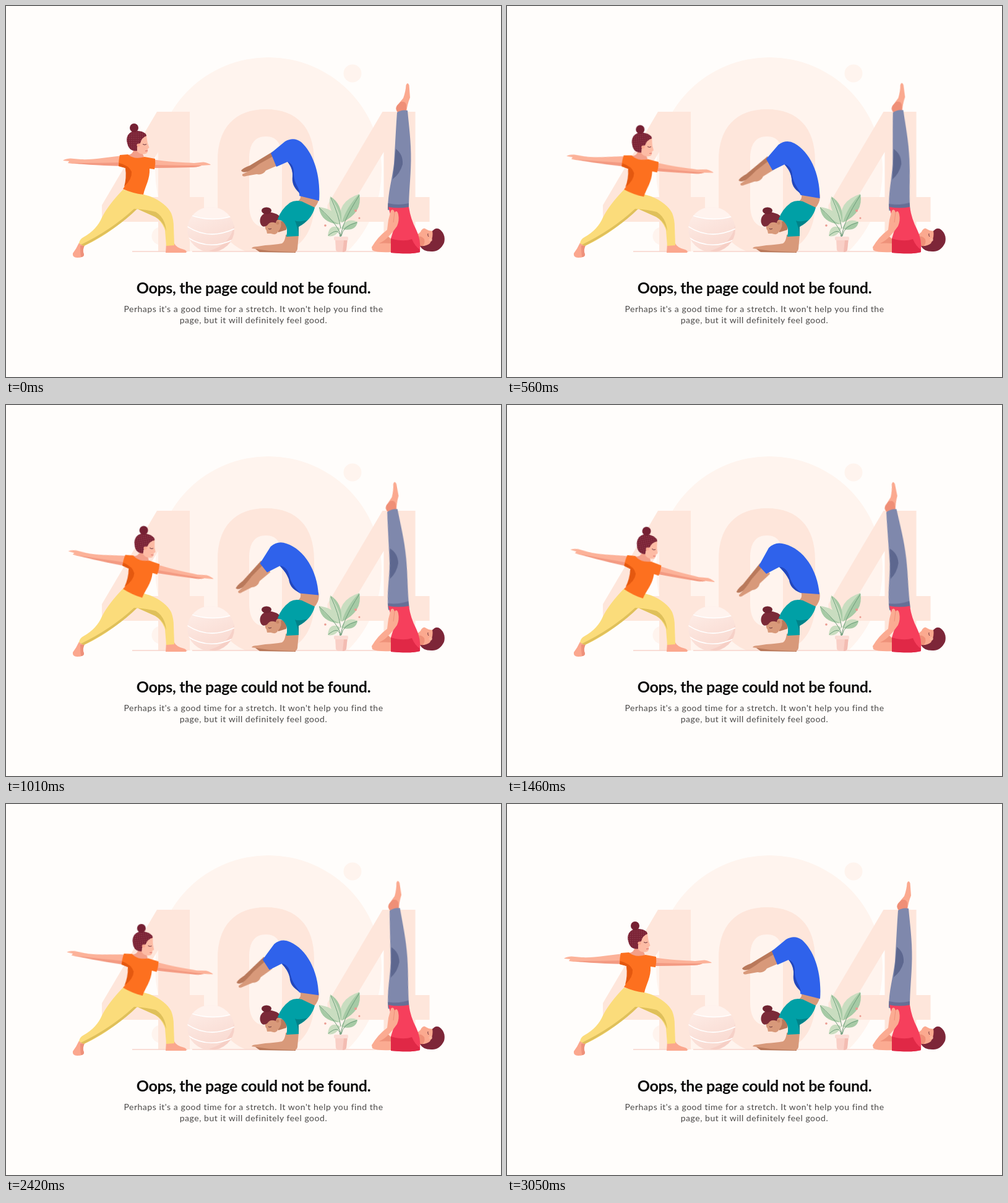
These frames come from a looping animation (800 by 600 pixels, 3.32 s). An HTML page:

```html
<!DOCTYPE html>
<html lang="en">
<head>
<meta charset="utf-8">
<title>Page not found</title>
<style>
html, body { margin: 0; width: 100%; height: 100%; overflow: hidden; background: #fffdfb; }
svg { display: block; width: 100vw; height: 100vh; }
text { font-family: Lato, "Open Sans", sans-serif; text-anchor: middle; }
.title { font-size: 25px; font-weight: 700; letter-spacing: -.3px; fill: #0b0b0b; }
.note { font-size: 14px; letter-spacing: .53px; fill: #4c4a49; }

.sway, .morph { animation: sway 3320ms linear infinite; }
.morph { animation-name: morph; }
.sway { transform-box: view-box; }
.torso { --turn: 11deg; transform-origin: 180px 297px; }
.feet { --turn: -20deg; --dx: -5px; --dy: -2px; transform-origin: 487px 297px; }
.raised { --turn: -7.3deg; transform-origin: 634px 322px; }

@keyframes sway {
  0%, 91.87%, 100% { transform: translate(0, 0) rotate(0deg); }
  6.02% { transform: translate(0, 0) rotate(0deg); animation-timing-function: cubic-bezier(.2, .32, .55, 1); }
  46.08% { transform: translate(var(--dx, 0), var(--dy, 0)) rotate(var(--turn)); }
  48.19% { transform: translate(var(--dx, 0), var(--dy, 0)) rotate(var(--turn)); animation-timing-function: cubic-bezier(.45, 0, .8, .75); }
}
@keyframes morph {
  0%, 91.87%, 100% { d: var(--rest); }
  6.02% { d: var(--rest); animation-timing-function: cubic-bezier(.2, .32, .55, 1); }
  46.08% { d: var(--bent); }
  48.19% { d: var(--bent); animation-timing-function: cubic-bezier(.45, 0, .8, .75); }
}
.thigh {
  --rest: path("M428 238L451 219Q465 211 477 220C497 238 509 274 506 315L474 307C476 300 465 292 463 276C464 266 460 258 455 252L437 260Z");
  --bent: path("M407 260L423 231Q434 220 449 225C479 233 502 266 505 306L475 304C470 302 459 297 456 283C452 275 448 270 440 262L419 273Z");
  d: var(--rest);
}
.crease {
  --rest: path("M455 252C462 254 466 262 465 272C466 288 473 292 475 303C464 294 462 284 463 276C464 266 460 258 455 252Z");
  --bent: path("M440 262C447 261 454 268 456 276C461 291 466 296 475 304C462 299 457 292 456 283C452 275 448 270 440 262Z");
  d: var(--rest);
}
</style>
</head>
<body>
<svg viewBox="0 0 800 600">
  <defs>
    <pattern id="dots" width="3" height="3" patternUnits="userSpaceOnUse">
      <rect width="3" height="3" fill="#7b2336"/>
      <circle cx="1.5" cy="1.5" r=".5" fill="#ab626d"/>
    </pattern>
    <linearGradient id="ballTone" x1="0" y1="0" x2=".35" y2="1">
      <stop offset=".2" stop-color="#fdebe5"/>
      <stop offset="1" stop-color="#f9dad1"/>
    </linearGradient>
    <clipPath id="ballEdge"><ellipse cx="331" cy="361.5" rx="38" ry="36.5"/></clipPath>
    <clipPath id="floor"><rect width="800" height="397"/></clipPath>
    <path id="four" d="M244 171H297V309H320V349H297V397H246V349H155V322ZM246 236L202 309H246Z" fill-rule="evenodd"/>
  </defs>

  <!-- backdrop -->
  <g clip-path="url(#floor)">
    <circle cx="424" cy="266" r="183" fill="#fff4ee"/>
    <circle cx="250" cy="372" r="14.5" fill="#fff4ee"/>
    <g fill="#fee6db">
      <use href="#four"/>
      <use href="#four" x="364.5"/>
      <path fill-rule="evenodd" d="M342 250C342 197 370 167 420 167S498 197 498 250V320C498 372 470 402 420 402S342 372 342 320ZM393 248V320C393 345 402 358 420 358S446 345 446 320V248C446 223 438 211 420 211S393 223 393 248Z"/>
    </g>
  </g>
  <circle cx="560" cy="109" r="14.5" fill="#fff4ee"/>
  <path d="M204 397H293M301 397H620" stroke="#f8d3ca" stroke-width="1.5"/>

  <!-- ball -->
  <g clip-path="url(#ballEdge)">
    <rect x="292" y="324" width="78" height="76" fill="url(#ballTone)"/>
    <path d="M300 324H364L365 340Q335 350 303 338Z" fill="#fff3ee"/>
    <path d="M369 352Q364 386 328 396L350 400L372 380Z" fill="#f4c6bb" opacity=".5"/>
    <g fill="none" stroke="#fff" stroke-width="1.6">
      <path d="M298 338Q331 350 365 340M292 356Q328 380 370 360M293 374Q328 397 369 377"/>
    </g>
  </g>

  <!-- plant -->
  <g>
    <g fill="#c9ddc0">
      <path d="M539 353Q509 351 506 325Q535 329 540 351Z"/>
      <path d="M540 349Q518 330 524 308Q543 320 542 348Z"/>
      <path d="M541 350Q534 316 571 304Q575 335 543 350Z"/>
      <path d="M542 359Q550 341 568 349Q567 363 545 361Z"/>
      <path d="M539 359Q522 351 520 372Q532 375 540 361Z"/>
    </g>
    <g fill="#a6caa5">
      <path d="M539 353Q521 346 506 325Q508 350 539 353Z"/>
      <path d="M541 349Q540 330 524 308Q544 320 542 348Z"/>
      <path d="M543 350Q550 325 571 304Q577 334 543 350Z"/>
      <path d="M544 361Q552 353 568 349Q565 365 544 361Z"/>
    </g>
    <path d="M541 374Q541 358 506 326M541 373Q543 350 571 306M541 360Q538 338 525 310M542 372Q544 356 567 350M540 373Q538 357 521 371" fill="none" stroke="#6e9d7b" stroke-width="1"/>
    <g fill="#ea9a90"><circle cx="565" cy="331" r="2"/><circle cx="516" cy="355" r="1.8"/><circle cx="571" cy="343" r="1.5"/></g>
    <path d="M532 376H552L550 394Q549 398 545 398H538Q534 398 533 394Z" fill="#f9d0c7"/>
    <rect x="530" y="373" width="23" height="6" rx="2" fill="#fbdcd5"/>
    <path d="M546 379H551.5L550 394Q549 398 544 398Z" fill="#f3bcb2"/>
  </g>

  <!-- lunging woman -->
  <g fill="#fba78e">
    <path d="M118 383L127 387Q123 395 126 402Q126 407 115 407Q107 407 108 400Q114 392 118 383Z"/>
    <path d="M120 388L127 387Q123 395 126 402Q126 406 121 406Q120 396 120 388Z" fill="#ee917b"/>
    <path d="M259 384H272Q275 391 288 394Q293 396 291 399H258Z"/>
  </g>
  <path d="M189 297L213 303L223 305C241 309 261 322 267 335Q271 345 271 358L272 387L259 388L257 363Q253 349 241 341L212 328C191 348 158 374 126 388L118 384Q119 377 125 374C140 366 150 354 155 342Q165 322 189 297Z" fill="#fbdc7b"/>
  <path d="M207 328Q226 329 242 333Q257 342 259 364Q254 348 241 341L212 328Q180 360 126 388L121 386Q169 363 207 328Z" fill="#dfc05b"/>
  <g class="sway torso">
    <path d="M190 242C165 244 142 249 121 248L104 246.500Q95 247 92 250L102 251L100 254Q111 256 122 255Q155 257 190 258Z" fill="#fcb299"/>
    <path d="M190 253Q150 254 110 254Q120 257 190 259Z" fill="#f39a82"/>
    <path d="M235 248C262 252 287 253 304 254L319 252.500Q328 254 331 257L316 258Q310 261 297 261L235 262Z" fill="#fcb299"/>
    <path d="M235 257Q275 258 316 258Q310 261 297 261L235 262Z" fill="#f39a82"/>
    <path d="M207 230H221L221 240Q226 246 215 250Q204 248 197 241Q206 240 207 230Z" fill="#f39f89"/>
    <path d="M211 213Q220 206 227 209Q228 218 229 222L231.500 229L229 231Q230 238 225 239Q217 241 212 235Z" fill="#fdbba4"/>
    <path d="M196 222C192 207 204 200 214 202C222 203 227 206 227 210Q219 213 217 222Q211 222 212 234Q199 236 196 222Z" fill="url(#dots)"/>
    <circle cx="207" cy="197" r="7" fill="#752033"/>
    <circle cx="214" cy="225" r="2.6" fill="#fba990"/>
    <path d="M221 223.500Q224 225.500 227 223.500" fill="none" stroke="#68303a" stroke-width="1"/>
    <path d="M225 234.500L229 234" stroke="#d96a65" stroke-width="1"/>
    <path d="M184 241L197 240Q207 249 224 244L241 247Q242 255 240 264L232 263C233 280 225 291 222 305Q205 303 189 296C196 287 195 275 193 262L182 259Q182 248 184 241Z" fill="#fd701f"/>
    <path d="M183 254Q199 258 203 268Q204 280 191 292Q195 278 193 262L182 259Z" fill="#e4580f"/>
  </g>

  <!-- arched woman -->
  <g class="sway feet">
    <path d="M432 235L394 258Q383 262 380 266Q382 270 390 268L416 262L438 248Z" fill="#b9795b"/>
    <path d="M437 240L410 255Q396 266 382 272Q381 277 388 275L405 272Q415 274 420 266L441 257Z" fill="#d8997a"/>
  </g>
  <path d="M470 317Q479 312 475 302L505 303Q508 316 498 327Z" fill="#d8997a"/>
  <path class="morph thigh" fill="#2f62eb"/>
  <path class="morph crease" fill="#2247bd"/>
  <path d="M403 393L440 391L468 396V399L410 398Z" fill="#b9795b"/>
  <path d="M452 370H473L471 393Q470 399 463 398L425 396L397 392Q398 389 406 389L419 387Q435 386 446 384Q451 381 452 370Z" fill="#d8997a"/>
  <path d="M437 346L451 349Q455 354 453 362L440 366Z" fill="#b9795b"/>
  <path d="M420 352Q428 341 443 345Q448 356 439 366Q436 371 428 368L422 368L421 363Q417 359 420 352Z" fill="#d8997a"/>
  <path d="M411 351C408 336 423 331 433 335Q443 337 444 346Q437 344 436 351Q427 347 422 355Q414 360 411 351Z" fill="#7b2a38"/>
  <ellipse cx="421" cy="331" rx="8" ry="5.500" fill="#702432"/>
  <circle cx="439" cy="351" r="2.500" fill="#c98565"/>
  <path d="M424 360Q426 362 429 360" fill="none" stroke="#633039" stroke-width="1"/>
  <path d="M439 345Q444 329 459 318Q467 313 478 316L499 326Q494 346 473 357V372L453 373Q456 360 451 353Q448 347 439 345Z" fill="#00a0a6"/>
  <path d="M473 357Q482 352 487 346Q472 350 467 347Q472 360 473 372Z" fill="#008288"/>

  <!-- shoulder stand -->
  <g class="sway raised">
    <path d="M634 173Q628 167 632 161L642 149Q646 138 646.500 128Q649 122 651.500 128Q652 134 653 148Q648 160 647 173Z" fill="#fba98f"/>
    <path d="M634 173Q628 167 632 161L638 155Q646 154 647 160L647 173Z" fill="#ef8f77"/>
    <path d="M632 172Q640 167 649 169C651 193 655 220 654.500 250C654 280 651 300 651 330H617C617 302 624 281 627 255C629 225 630 200 632 172Z" fill="#7f88ac"/>
    <path d="M630 231Q642 240 641 256Q637 271 625 280Q628 255 630 231Z" fill="#5d678f"/>
    <path d="M617.500 319Q634 323 651 319V328H617Z" fill="#666f96"/>
  </g>
  <path d="M663 370Q670 367 671 363Q675 357 679 361Q685 365 692 363L693 385Q680 392 672 389L661 387Z" fill="#fba98f"/>
  <path d="M661 374Q670 370 676 377Q678 385 672 389L661 388Z" fill="#ef8f77"/>
  <path d="M689 364Q696 356 703 363Q711 371 708 383Q702 396 690 397Q674 398 669 388Q679 389 685 384Q691 374 689 364Z" fill="#7d2638"/>
  <circle cx="686" cy="378" r="2.700" fill="#fbb69f"/>
  <path d="M682 368Q681 371 683 373" fill="none" stroke="#68303a" stroke-width="1"/>
  <path d="M618 325Q634 328 651 325Q654 345 663 362Q671 378 669 398Q655 402 622 399V376L627 360Z" fill="#f63f5c"/>
  <path d="M622 376Q642 382 656 377Q661 389 669 394V398Q655 402 622 399Z" fill="#e02846"/>
  <path d="M591 390Q601 373 616 362L618 346L622 331Q626 327 628 334Q632 329 634 337Q636 347 632 356Q626 365 618 373L622 377V398Q600 399 592 395Z" fill="#fbab92"/>
  <path d="M603 384Q613 379 618 373L622 377V384Q612 383 603 384Z" fill="#ef927a"/>
  <path d="M628 334L626 350" stroke="#ef927a" stroke-width="1"/>

  <text class="title" x="400" y="465">Oops, the page could not be found.</text>
  <text class="note" x="400" y="495">Perhaps it's a good time for a stretch. It won't help you find the</text>
  <text class="note" x="400" y="512.500">page, but it will definitely feel good.</text>
</svg>
</body>
</html>
```
